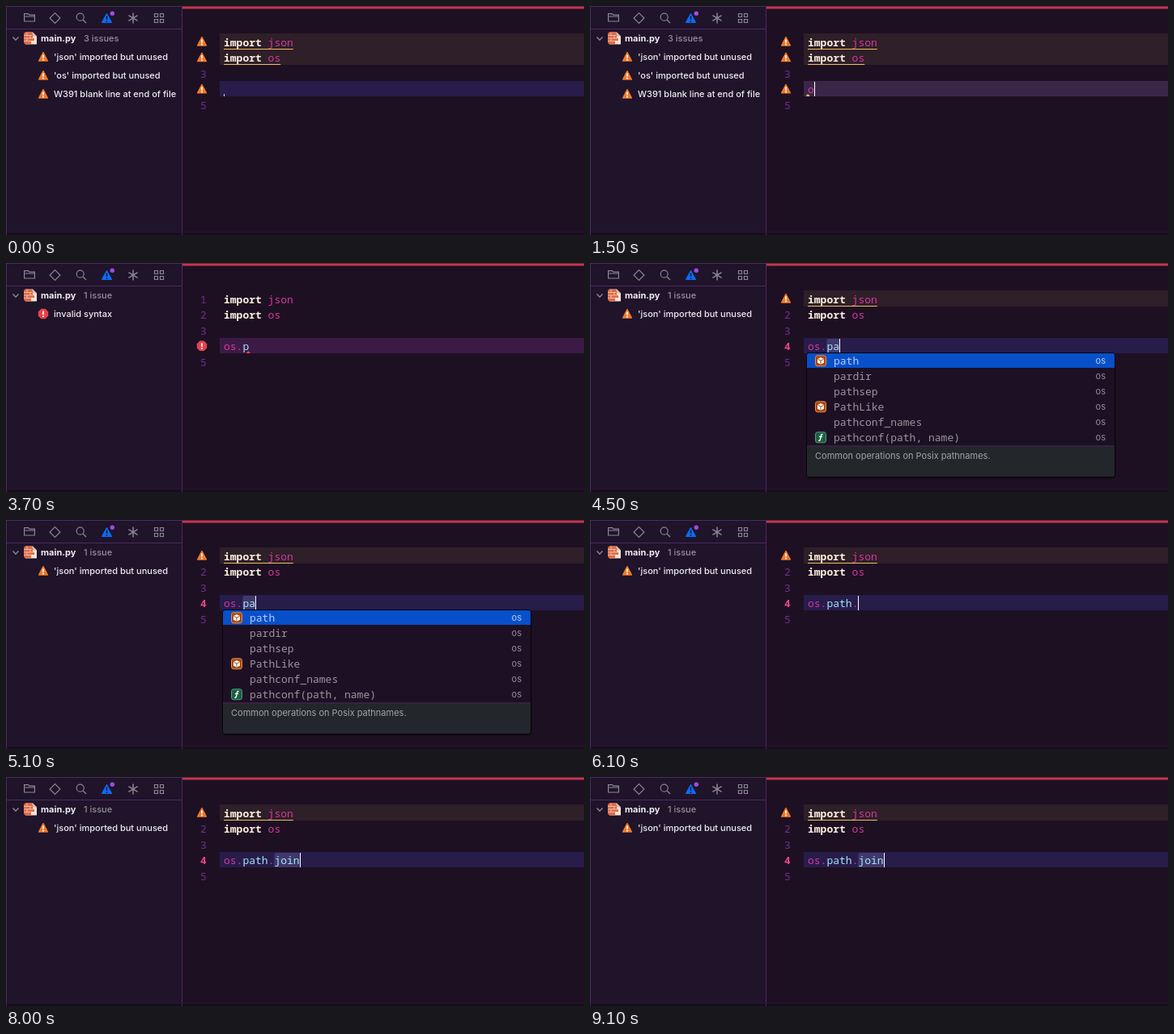
These frames come from a looping animation (714x284 px, 9200 ms). An HTML page:

```html
<!DOCTYPE html>
<html lang="en">
<head>
<meta charset="utf-8">
<title>Code completion</title>
<style>
  html, body { margin: 0; width: 100%; height: 100%; overflow: hidden; background: #1e1023; }
  svg { display: block; width: 714px; height: 284px; }
  text { white-space: pre; }
  .ui { font: 500 11px Inter, "Open Sans", sans-serif; fill: #f0edf2; }
  .code { font: 500 13px "Noto Sans Mono", "DejaVu Sans Mono", monospace; }
  .soft { font-weight: 400; }
  .strong { font-weight: 700; }
  .semi { font-weight: 600; }
</style>
</head>
<body>
<svg viewBox="0 0 714 284" xmlns="http://www.w3.org/2000/svg">
  <defs>
    <g id="warn">
      <path d="M0-5.3 5.4 5H-5.4Z" fill="#ee7a2b" stroke="#ee7a2b" stroke-width="1.4" stroke-linejoin="round"/>
      <path d="M0-2.6V1.6M0 2.8V4.4" stroke="#fff" stroke-width="1.8"/>
    </g>
    <g id="error">
      <path d="M-2.6-6.2H2.6L6.2-2.6V2.6L2.6 6.2H-2.6L-6.2 2.6V-2.6Z" fill="#e8414d"/>
      <path d="M0-3.6V1M0 2.3V4" stroke="#fff" stroke-width="1.8"/>
    </g>
    <g id="box">
      <rect x="-6.5" y="-6.5" width="13" height="13" rx="2.5" fill="#a6470f" stroke="#ef8a45"/>
      <path d="M0-4.4 4-2.4V2.4L0 4.5-4 2.4V-2.4Z" fill="#fff"/>
      <path d="M-3.6-2 0-.2 3.6-2M0-.2V4" fill="none" stroke="#a6470f"/>
    </g>
    <g id="func">
      <rect x="-6.5" y="-6.5" width="13" height="13" rx="2.5" fill="#1d5f43" stroke="#4f9c78"/>
      <path d="M2.6-3.6C.8-4.4.5-3 .2-1.2L-.5 2.4C-.8 3.8-1.5 4.2-2.7 3.8M-2-.9H2.2" fill="none" stroke="#fff" stroke-width="1.4"/>
    </g>
  </defs>

  <rect width="714" height="284" fill="#1e1023"/>
  <rect width="218" height="284" fill="#1f142a"/>
  <rect x="218" y=".5" width="496" height="3" fill="#c2364f"/>
  <rect y="281" width="714" height="3" fill="#190d1f"/>
  <path d="M0 .5H217M.5 0V284M0 28.5H217M217.5 0V284" stroke="#4d2862" fill="none"/>
  <path d="M0 280.5H714" stroke="#2a1535"/>

  <g fill="none" stroke="#8d8494" stroke-width="1.2">
    <path d="M22.6 19V9.6H27.5L29 11.1H35.4V19ZM22.6 13H35.4"/>
    <path d="M60.5 8.6 66.9 15 60.5 21.4 54.1 15Z"/>
    <circle cx="91.7" cy="13.7" r="4.5"/>
    <path d="M95 17 99 21"/>
    <path d="M157 8.5V21.5M151.4 11.7 162.6 18.3M151.4 18.3 162.6 11.7" stroke-width="1.5"/>
    <path d="M183.5 9.5h4v4h-4zM190.5 9.5h4v4h-4zM183.5 16.5h4v4h-4zM190.5 16.5h4v4h-4z"/>
    <path d="M8.5 38.5 12 42.3 15.5 38.5" stroke-width="1.4"/>
  </g>
  <path d="M124.5 9.8 130.3 20.3H118.7Z" fill="#0a6cf5" stroke="#0a6cf5" stroke-width="1.4" stroke-linejoin="round"/>
  <path d="M124.5 12.6V17M124.5 18.3V19.9" stroke="#1f142a" stroke-width="1.5"/>
  <circle cx="131.3" cy="9.3" r="2.7" fill="#a14be0"/>

  <path d="M24 32.5H33L38 37.5V47.5H24Z" fill="#f4e3da"/>
  <path d="M24 32.5H31Q33 32.5 33 35V38Q33 40 35 40.5V43H31V47.5H25Q22 47.5 22 44V35Q22 32.5 24 32.5Z" fill="#df6a45"/>
  <path d="M33 32.5V37.5H38Z" fill="#d5bdb3"/>
  <path d="M22 36.5H32M22 40H34M22 43.5H31M26 33V36.5M30 36.5V40M26 40V43.5" stroke="#f6cdb9" stroke-width=".8"/>
  <text class="ui strong" x="43" y="44">main.py</text>

  <g id="view"></g>
</svg>
<script>
const LOOP = 9200, LEFT = 269, CHAR = 7.8;
const PINK = '#d4389f', CYAN = '#a5e6fb', CREAM = '#fbf0dc', YELLOW = '#f0c060';
const view = document.getElementById('view');

// [time, typed text, start of the highlighted prefix]
const keys = [
  [-500, '', -1], [1300, 'o', -1], [1900, 'os', -1], [2500, 'os.', -1],
  [3100, 'os.p', -1], [4100, 'os.pa', 3], [5500, 'os.path', 3],
  [5900, 'os.path.', -1], [6300, 'os.path.j', 8], [6500, 'os.path.jo', 8],
  [8000, 'os.path.join', 8]
];

const json = ['warn', "'json' imported but unused"];
const os = ['warn', "'os' imported but unused"];
const blank = ['warn', 'W391 blank line at end of file'];
// [time, issues, gutter marks by line]
const checks = [
  [0, [json, os, blank], { 1: 'warn', 2: 'warn', 4: 'warn' }],
  [1900, [json, os, blank], { 1: 'warn', 2: 'warn' }],
  [2200, [['error', "undefined name 'o'"], json, os], { 1: 'warn', 2: 'warn' }],
  [3400, [['error', 'invalid syntax']], { 4: 'error' }],
  [4400, [json], { 1: 'warn' }]
];

const popups = [
  { from: 4300, to: 5500, x: 267.5, source: 'os',
    rows: [['path', 'box'], ['pardir'], ['pathsep'], ['PathLike', 'box'], ['pathconf_names'], ['pathconf(path, name)', 'func']],
    notes: ['Common operations on Posix pathnames.'], height: 154, noteY: 243 },
  { from: 6300, to: 8000, x: 306.5, source: 'os.path',
    rows: [['join(path, paths)', 'func']],
    notes: ['join(path: _StrPath, *paths: _StrPath) -> Text', 'join(path: _BytesPath, *paths: _BytesPath) -> bytes'],
    height: 60, noteY: 149 }
];

const latest = (list, t) => list.filter(item => item[0] <= t).pop();
const escape = s => s.replace(/&/g, '&amp;').replace(/</g, '&lt;').replace(/>/g, '&gt;');
const rect = (x, y, w, h, fill, extra = '') =>
  `<rect x="${x}" y="${y}" width="${w}" height="${h}" fill="${fill}" ${extra}/>`;
const text = (cls, x, y, s, fill = '', extra = '') =>
  `<text class="${cls}" x="${x}" y="${y}" style="${fill && 'fill:' + fill}" ${extra}>${escape(s)}</text>`;
const icon = (id, x, y) => `<use href="#${id}" x="${x}" y="${y}"/>`;
const lineY = n => 49.7 + (n - 1) * 19.5;

function sidebar(issues) {
  const count = issues.length + (issues.length > 1 ? ' issues' : ' issue');
  return text('ui', 96, 44, count, '#96909c') +
    issues.map(([kind, label], i) =>
      icon(kind, 46, 63 + i * 23) + text('ui', 59, 67 + i * 23, label)).join('');
}

function gutter(marks) {
  let out = '';
  for (let n = 1; n <= 5; n++) {
    if (marks[n]) out += icon(marks[n], 242, 44 + (n - 1) * 19.6);
    else if (n === 4) out += text('code strong', 240, lineY(n), '4', '#f04790');
    else out += text('code', 240, lineY(n), String(n), '#6c2f8c');
  }
  return out;
}

function imports(marks) {
  return ['json', 'os'].map((name, i) => {
    const n = i + 1, y = i ? 54 : 34;
    const mark = marks[n]
      ? rect(264, y, 450, i ? 19 : 20, '#2f1f28') +
        rect(LEFT, i ? 72 : 53, (7 + name.length) * CHAR, 1, YELLOW) : '';
    return mark + text('code semi', LEFT, lineY(n), 'import', CREAM) +
      text('code', LEFT + 7 * CHAR, lineY(n), name, PINK);
  }).join('');
}

function typedLine(typed, prefix, mark) {
  const bg = mark === 'error' ? '#3b1b46' : mark && typed ? '#3a2748' : '#281c4b';
  let out = rect(264, 93, 450, 19, bg);
  if (prefix >= 0)
    out += rect(LEFT + prefix * CHAR, 94, (typed.length - prefix) * CHAR, 18, '#40386a', 'rx="2"');
  const spans = typed.split(/(\.)/).map((part, i) =>
    `<tspan fill="${i < 2 || part === '.' ? PINK : CYAN}">${part}</tspan>`).join('');
  out += `<text class="code" x="${LEFT}" y="${lineY(4)}">${spans}</text>`;
  if (mark === 'error') out += '<path d="M296.5 112 299.5 109 302 112Z" fill="#ef4350"/>';
  else if (mark && typed) out += `<path d="M266.5 112 269 109 272 112Z" fill="${YELLOW}"/>`;
  else if (mark) out += rect(LEFT, 109, 1, 3, '#e8d7bc');
  return out;
}

function popup({ x, source, rows, notes, height, noteY }) {
  const split = 111.5 + rows.length * 19 + 1;
  let out = rect(x + 1, 114, 381, height, '#000', 'rx="4" opacity=".3"') +
    rect(x, 111.5, 381, height, '#23262a', 'rx="3"') +
    rect(x, 111.5, 381, split - 111.5, '#1e1024') +
    rect(x, 112, 381, 18, '#0750ca') +
    rect(x, split, 381, 1, '#482452');
  rows.forEach(([label, kind], i) => {
    const y = 121.3 + i * 19;
    if (kind) out += icon(kind, x + 17.5, y);
    out += text('code', x + 33.5, y + 4.5, label, i ? '#9c939f' : '#b9cbef') +
      text('ui soft', x + 369.5, y + 4, source, i ? '#938b98' : '#bccdf0', 'text-anchor="end"');
  });
  notes.forEach((note, i) => {
    out += text('ui soft', x + 10.5, noteY + i * 14, note, '#a5a4a8');
  });
  return out + rect(x, 111.5, 381, height, 'none', 'rx="3" stroke="#08050b"');
}

function scene(t) {
  const [since, typed, prefix] = latest(keys, t);
  const [, issues, marks] = latest(checks, t);
  const caretOn = (t - since) % 1000 < 500;
  const open = popups.find(p => t >= p.from && t < p.to);
  return sidebar(issues) + imports(marks) + typedLine(typed, prefix, marks[4]) + gutter(marks) +
    (caretOn ? rect(Math.round(LEFT + typed.length * CHAR), 94, 1, 18, '#fff') : '') +
    (open ? popup(open) : '');
}

let shown = '';
function draw(now) {
  const next = scene(now % LOOP);
  if (next !== shown) view.innerHTML = shown = next;
  requestAnimationFrame(draw);
}
draw(0);
</script>
</body>
</html>
```
